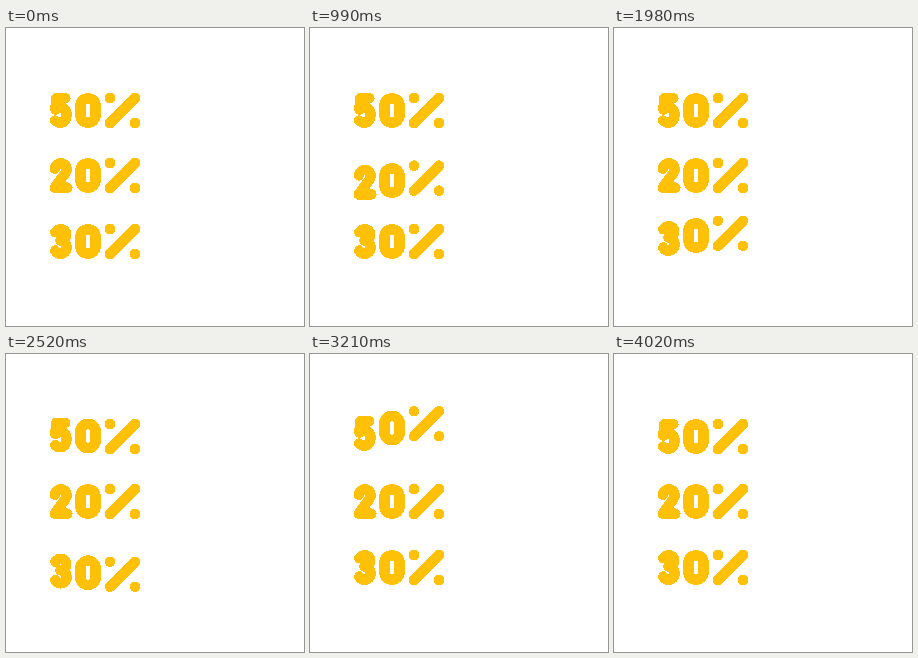
Write an HTML page that moves like this. It is 298 px wide and 298 px high and loops after 5130 ms.

```html
<!DOCTYPE html>
<html lang="en">
<head>
<meta charset="utf-8">
<title>Percentages</title>
<style>
  html, body { margin: 0; width: 100%; height: 100%; overflow: hidden; background: #fff; }
  svg { display: block; width: 100%; height: 100%; }
  path { fill: none; stroke: #ffc107; stroke-width: 10.5; stroke-linecap: round; stroke-linejoin: round; shape-rendering: crispEdges; }
</style>
</head>
<body>
<svg viewBox="0 0 298 298" role="img" aria-label="50%, 20%, 30%"></svg>
<script>
const LOOP = 5130, TICK = 30, STAGGER = 56;
const RISE = 600, FALL = 460, SETTLE = 460;

// Centre lines of the glyphs; y is measured from the top of the row.
const glyphs = {
  5: 'M59.3 5.3H50.3L49.4 16.6C51.5 15 53.3 14.5 55 14.5C58.6 14.5 60.6 18 60.6 21.6C60.6 26.4 58 29.7 54.3 29.7C52 29.7 50.4 28.8 49.3 27.6',
  2: 'M48.8 10.6C49.3 7.2 52 5.3 55 5.3C58.5 5.3 60.7 8 60.7 11C60.7 15.5 55 20 48.8 29.7H61.3',
  3: 'M49.4 8.2C50.8 6.2 53 5.3 55 5.3C58.4 5.3 60.2 8 60.2 10.6C60.2 14 57.6 16.2 54.5 16.6C58.4 17 60.6 20 60.6 23C60.6 27 58 29.7 54.5 29.7C52 29.7 50.2 28.6 49.3 26.6',
  0: 'M74.3 13V22A7.7 7.7 0 0 0 89.7 22V13A7.7 7.7 0 0 0 74.3 13Z',
  '%': 'M104 30L129 5M104 5h.01M129 30h.01'
};

const rows = [
  { text: '20%', top: 130, start: 0, up: 7, down: 7.6 },
  { text: '30%', top: 196, start: 1200, up: 9, down: 9 },
  { text: '50%', top: 65, start: 2400, up: 16, down: 14 }
];

const svg = document.querySelector('svg');
const parts = rows.flatMap(row => [...row.text].map((char, i) => {
  const node = document.createElementNS(svg.namespaceURI, 'path');
  node.setAttribute('d', glyphs[char]);
  svg.append(node);
  return { ...row, node, start: row.start + i * STAGGER };
}));

const mix = (from, to, u) => from + (to - from) * (1 - Math.cos(Math.PI * u)) / 2;

function offset(t, up, down) {
  if (t <= 0) return 0;
  if (t < RISE) return mix(0, -up, t / RISE);
  t -= RISE;
  if (t < FALL) return mix(-up, down, t / FALL);
  t -= FALL;
  return t < SETTLE ? mix(down, 0, t / SETTLE) : 0;
}

function draw(now) {
  const t = Math.floor((now % LOOP) / TICK) * TICK;
  for (const { node, top, start, up, down } of parts) {
    node.setAttribute('transform', `translate(0 ${top + offset(t - start, up, down)})`);
  }
}

const origin = performance.now();
function frame() {
  draw(performance.now() - origin);
  requestAnimationFrame(frame);
}
frame();
</script>
</body>
</html>
```
